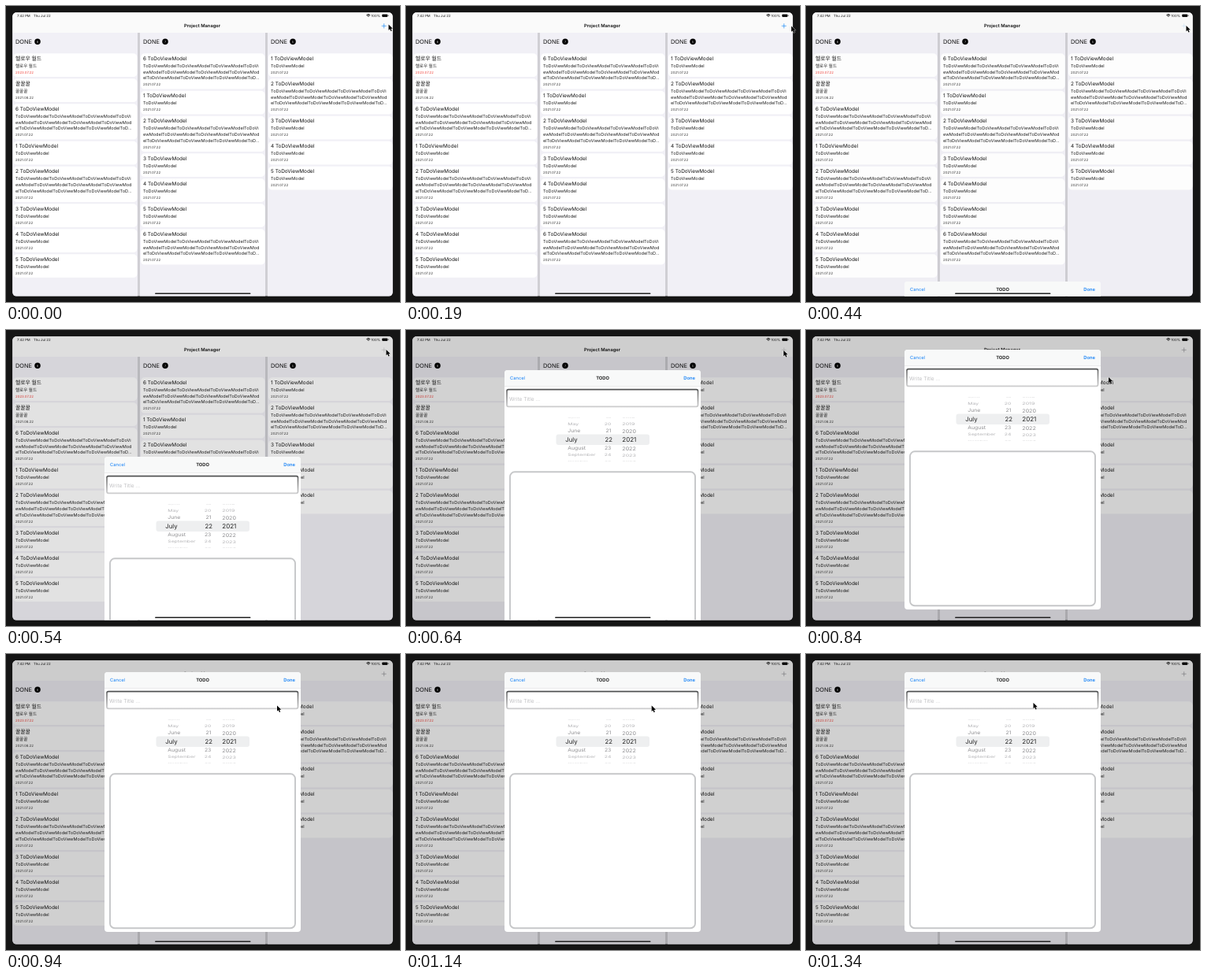
An HTML page with a canvas that plays this animation: 500x376 px, repeating every 1.39 s.

```html
<!DOCTYPE html>
<html lang="en">
<head>
<meta charset="utf-8">
<title>Project Manager</title>
<style>
  html, body { margin: 0; width: 100%; height: 100%; overflow: hidden; background: #151515; }
  canvas { display: block; width: 500px; height: 376px; }
</style>
</head>
<body>
<canvas id="stage"></canvas>
<script>
const WIDTH = 500, HEIGHT = 376, LOOP = 1390;
const FAMILY = 'Inter, "Noto Sans CJK KR", "Noto Sans CJK JP", sans-serif';
const canvas = document.getElementById('stage');
const ctx = canvas.getContext('2d');
const ratio = window.devicePixelRatio || 1;
canvas.width = WIDTH * ratio;
canvas.height = HEIGHT * ratio;

// Keyframes: [time, value, ...]
const sheetTop = [[390, 370], [440, 350], [490, 260], [540, 161], [590, 93], [640, 51],
  [690, 38.5], [740, 31], [790, 27], [840, 25], [890, 23.8], [940, 23]];
const dimming = [[390, 0], [440, 0.008], [490, 0.06], [540, 0.115], [590, 0.17], [740, 0.185]];
const pointer = [[0, 485.5, 23.5], [190, 489, 25.5], [340, 484, 25], [440, 482.5, 25],
  [540, 482.5, 25], [640, 479.2, 26], [690, 461, 35], [740, 434, 46.5], [840, 384, 60],
  [940, 344, 65.5], [1090, 317.5, 66.5], [1340, 288.5, 62]];

function sample(keys, t) {
  const next = keys.findIndex(key => key[0] > t);
  if (next === 0) return keys[0].slice(1);
  if (next < 0) return keys[keys.length - 1].slice(1);
  const a = keys[next - 1], b = keys[next];
  const k = (t - a[0]) / (b[0] - a[0]);
  return a.slice(1).map((v, i) => v + (b[i + 1] - v) * k);
}

function text(str, x, y, size, color = '#111', { weight = 400, align = 'left', squash = 1 } = {}) {
  ctx.save();
  ctx.translate(x, y);
  ctx.scale(1, squash);
  ctx.font = `${weight} ${size}px ${FAMILY}`;
  ctx.textRendering = 'geometricPrecision';
  ctx.textAlign = align;
  ctx.fillStyle = color;
  ctx.fillText(str, 0, size * 0.36);
  ctx.restore();
}

function roundRect(x, y, w, h, r) {
  ctx.beginPath();
  ctx.roundRect(x, y, w, h, r);
}

function fillRound(x, y, w, h, r, color) {
  roundRect(x, y, w, h, r);
  ctx.fillStyle = color;
  ctx.fill();
}

function fillRect(x, y, w, h, color) {
  ctx.fillStyle = color;
  ctx.fillRect(x, y, w, h);
}

const NAME = 'ToDoViewModel';
const LINES = [
  NAME.repeat(3) + 'ToDoVi',
  'ewModel' + NAME.repeat(2) + 'ToDoViewMod',
  'el' + NAME.repeat(3) + 'ToD…'
];
const todo = n => ({ title: `${n} ${NAME}`, body: n === 2 || n === 6 ? LINES : [NAME], date: '2021.07.22' });
const columns = [
  { x: 8, cards: [
    { title: '헬로우 월드', body: ['헬로우 월드'], date: '2023.07.22', late: true, hangul: true },
    { title: '꿀꿀꿀', body: ['꿀꿀꿀'], date: '2021.08.22', hangul: true },
    ...[6, 1, 2, 3, 4, 5].map(todo)] },
  { x: 170, cards: [6, 1, 2, 3, 4, 5, 6].map(todo) },
  { x: 332, cards: [1, 2, 3, 4, 5].map(todo) }
];

function drawColumn({ x, cards }) {
  fillRect(x, 34, 159, 335, '#f1f0f6');
  text('DONE', x + 4, 45.3, 7.4);
  ctx.beginPath();
  ctx.arc(x + 32, 45.2, 3.75, 0, Math.PI * 2);
  ctx.fillStyle = '#000';
  ctx.fill();
  text(cards.length, x + 32, 45.2, 3.8, '#ccc', { align: 'center' });

  let y = 66.3;
  for (const card of cards) {
    const extra = (card.body.length - 1) * 7.75;
    const weight = card.hangul ? 500 : 400;
    fillRound(x + 1, y - 6, 157.5, 29.8 + extra, 5, '#fff');
    text(card.title, x + 4, y, card.hangul ? 6.8 : 6.45, '#111', { weight });
    card.body.forEach((line, i) => text(line, x + 4, y + 9.5 + i * 7.75, 5.55, '#222', { weight }));
    text(card.date, x + 4, y + 17.8 + extra, 4.35, card.late ? '#f0413a' : '#333');
    y += 32 + extra;
  }
}

function drawStatusBar() {
  text('7:42 PM', 14, 12.2, 4.3);
  text('Thu Jul 22', 35, 12.2, 4.3);
  text('100%', 463.5, 12.2, 4.3);
  ctx.strokeStyle = '#111';
  ctx.lineWidth = 0.9;
  for (const r of [1, 2.2, 3.4]) {
    ctx.beginPath();
    ctx.arc(459.8, 14, r, -Math.PI * 0.75, -Math.PI * 0.25);
    ctx.stroke();
  }
  fillRound(477.2, 10.4, 7.2, 3.5, 1.2, '#111');
  fillRect(484.9, 11.5, 0.7, 1.4, '#555');
}

function drawPlus(t) {
  ctx.save();
  ctx.globalAlpha = t < 340 ? 0.85 : t < 490 ? 0.15 : t < 690 ? 0.35 : 0.75;
  ctx.strokeStyle = t < 490 ? '#1686f5' : '#8a8a8e';
  ctx.lineWidth = 0.8;
  ctx.beginPath();
  ctx.moveTo(476.7, 25.3);
  ctx.lineTo(482.7, 25.3);
  ctx.moveTo(479.7, 22.3);
  ctx.lineTo(479.7, 28.3);
  ctx.stroke();
  ctx.restore();
}

function drawPicker(top) {
  const rows = [
    ['April', '19', '2018', -27.5, 0.2], ['May', '20', '2019', -19.8, 0.68],
    ['June', '21', '2020', -11, 0.92], ['July', '22', '2021', 0, 1],
    ['August', '23', '2022', 11, 0.92], ['September', '24', '2023', 19.6, 0.68],
    ['October', '25', '2024', 27.3, 0.2]
  ];
  const mid = top + 88.2;
  fillRound(190.5, mid - 6.7, 118.5, 13.4, 3, '#eeeff0');
  for (const [month, day, year, dy, squash] of rows) {
    const active = dy === 0;
    const size = active ? 7.8 : 6.8;
    const color = active ? '#222' : squash > 0.9 ? '#8f8f92' : squash > 0.5 ? '#b2b2b5' : '#d0d0d2';
    text(month, active ? 202.3 : 205.3, mid + dy, size, color, { squash });
    text(day, active ? 262 : 260.3, mid + dy, size, color, { align: 'right', squash });
    text(year, 274.3, mid + dy, active ? 8 : 7.1, color, { squash });
  }
}

function drawSheet(top) {
  if (top >= 369) return;
  const x = 125, w = 249, h = 330;
  ctx.save();
  roundRect(x, top, w, h, 4);
  ctx.clip();
  fillRect(x, top, w, h, '#fff');
  fillRect(x, top, w, 20, '#f8f9f9');
  fillRect(x, top + 20, w, 0.5, '#d6d6d8');
  text('Cancel', 132, top + 10.2, 5.8, '#1580f6');
  text('TODO', 249.6, top + 10.2, 5.8, '#111', { weight: 600, align: 'center' });
  text('Done', 367, top + 10.2, 5.8, '#1580f6', { weight: 600, align: 'right' });

  const edge = ctx.createLinearGradient(0, top + 24, 0, top + 47);
  edge.addColorStop(0, '#484a4b');
  edge.addColorStop(0.15, '#777');
  edge.addColorStop(1, '#cfcfd0');
  ctx.strokeStyle = edge;
  ctx.lineWidth = 1.7;
  roundRect(128, top + 24.7, 242.5, 21.6, 2);
  ctx.stroke();
  text('Write Title ...', 131, top + 36.2, 6.6, '#c0c0c3');

  drawPicker(top);

  ctx.strokeStyle = '#c6c7c9';
  ctx.lineWidth = 1.9;
  roundRect(132, top + 129.3, 235, 196, 6);
  ctx.stroke();
  ctx.restore();
}

function drawPointer([x, y]) {
  ctx.save();
  ctx.translate(x, y);
  ctx.beginPath();
  [[0, 0], [0, 7.3], [1.7, 5.8], [2.9, 8.6], [4.2, 8], [3, 5.3], [5.3, 5.2]]
    .forEach(point => ctx.lineTo(...point));
  ctx.closePath();
  ctx.lineJoin = 'round';
  ctx.lineWidth = 1;
  ctx.strokeStyle = 'rgba(255,255,255,.75)';
  ctx.stroke();
  ctx.fillStyle = '#000';
  ctx.fill();
  ctx.restore();
}

function draw(t) {
  ctx.setTransform(ratio, 0, 0, ratio, 0, 0);
  fillRect(0, 0, WIDTH, HEIGHT, '#151515');

  ctx.save();
  roundRect(8.3, 8.3, 482.4, 360.3, 5);
  ctx.clip();
  fillRect(8, 8, 483, 361, '#d0cfd4');
  fillRect(8, 8, 483, 26, '#fafafa');
  drawStatusBar();
  text('Project Manager', 249, 25.2, 5.8, '#111', { weight: 600, align: 'center' });
  drawPlus(t);
  columns.forEach(drawColumn);
  fillRect(8, 8, 483, 361, `rgba(0,0,0,${sample(dimming, t)[0]})`);
  drawSheet(sample(sheetTop, t)[0]);
  fillRound(189, 364.5, 121.5, 1.6, 0.8, '#222');
  ctx.restore();

  drawPointer(sample(pointer, t));
}

// The picture advances in 50 ms steps after a 40 ms hold.
let start;
function tick(now) {
  start ??= now;
  const t = (now - start) % LOOP;
  draw(t < 40 ? 0 : 40 + 50 * Math.floor((t - 40) / 50));
  requestAnimationFrame(tick);
}

draw(0);
requestAnimationFrame(tick);
</script>
</body>
</html>
```
